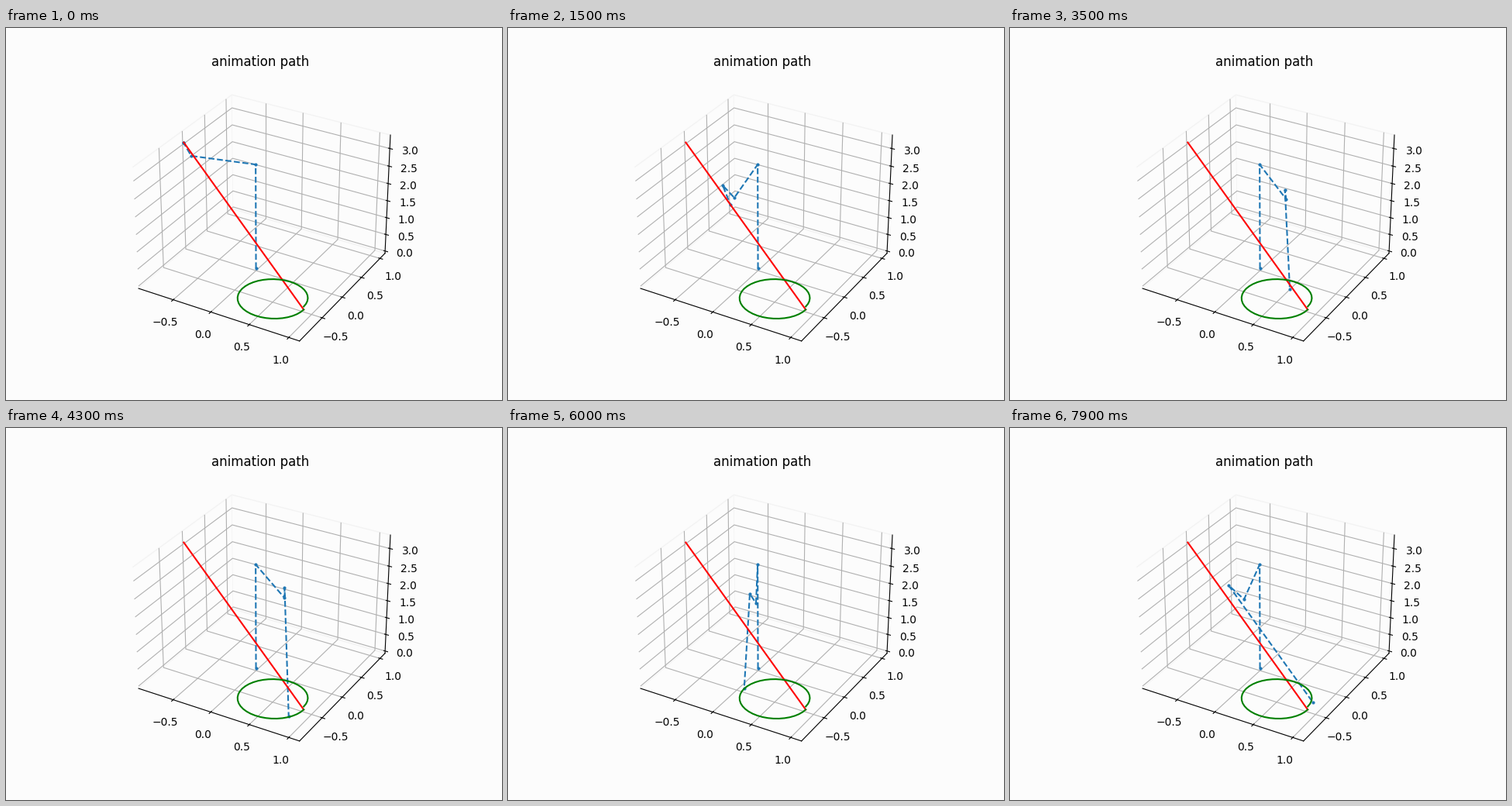
Write a matplotlib script that moves like this. It is 640 px wide and 480 px high and loops after 8000 ms.

```python
import numpy as np
import matplotlib.pyplot as plt
from matplotlib.animation import FuncAnimation
from matplotlib.lines import Line2D
from matplotlib.transforms import Affine2D
from mpl_toolkits.mplot3d import proj3d

WIDTH, HEIGHT = 640, 480
STEPS = 40          # frames per path section
BACKGROUND = "#fcfcfc"
frames = np.arange(2 * STEPS)

# Path of the tool: a straight move, then one slightly rising turn.
start = np.array([-0.838, -0.185, 3.31])
turn = np.linspace(0, 1, STEPS + 1)
angle = -2 * np.pi * turn
circle = np.column_stack([0.5 + 0.4 * np.cos(angle),
                          -0.5 + 0.4 * np.sin(angle), 0.09 * turn])
straight = start + turn[:, None] * (circle[0] - start)
path = np.vstack([straight[:-1], circle[:-1]])

fig = plt.figure(figsize=(WIDTH / 100, HEIGHT / 100), dpi=100,
                 facecolor=BACKGROUND)
ax = fig.add_subplot(projection="3d", facecolor=BACKGROUND)
ax.set_title("animation path")


def padded(low, high, margin):
    """Widen a data range by a relative margin plus the 3D box border."""
    pad = (high - low) * (margin + (1 + 2 * margin) / 48)
    return low - pad, high + pad


ax.set_xlim(*padded(start[0], 1, 0.05))
ax.set_ylim(*padded(-0.9, 1, 0.05))
ax.set_zlim(*padded(0, start[2], 0))
ax.set_xticks(np.arange(-0.5, 1.1, 0.5))
ax.set_yticks(np.arange(-0.5, 1.1, 0.5))
ax.set_zticks(np.arange(0, 3.1, 0.5))
for axis in (ax.xaxis, ax.yaxis, ax.zaxis):
    axis.set_pane_color((0.988, 0.988, 0.988, 1))
    axis.pane.set_edgecolor("#f3f3f3")

ax.plot(*straight.T, color="red")
ax.plot(*circle.T, color="green")
ax.apply_aspect()


def to_stage(points):
    """Project 3D points to stage pixels, y pointing down."""
    x, y, _ = proj3d.proj_transform(*points.T, ax.get_proj())
    pixels = ax.transData.transform(np.column_stack([x, y]))
    return np.column_stack([pixels[:, 0], HEIGHT - pixels[:, 1]])


def yaw(points, turn_by):
    """Rotate points clockwise about the base axis."""
    x, y, z = points.T
    c, s = np.cos(turn_by), np.sin(turn_by)
    return np.column_stack([c * x + s * y, c * y - s * x, z])


def spline(t, p):
    """Smooth curve through the points p at times t, for every frame."""
    slope = np.gradient(p, t, axis=0, edge_order=2)
    i = np.clip(np.searchsorted(t, frames, side="right") - 1, 0, len(t) - 2)
    h = (t[i + 1] - t[i])[:, None]
    s = (frames - t[i])[:, None] / h
    return ((1 + 2 * s) * (1 - s) ** 2 * p[i] + s * (1 - s) ** 2 * h * slope[i]
            + s ** 2 * (3 - 2 * s) * p[i + 1] + s ** 2 * (s - 1) * h * slope[i + 1])


base, shoulder = to_stage(np.array([[0, 0, 0], [0, 0, 3]]))

# Key poses on the stage: frame, elbow x and y, wrist x and y.
poses = np.array([
    (0, 239, 165, 229, 148),
    (15, 292, 219, 277, 203),
    (24, 326, 226, 317, 216),
    (39, 361, 219, 361, 206),
    (60, 320, 226, 312, 214),
    (79, 302, 221, 282, 203)], dtype=float)
elbow, wrist = np.split(spline(poses[:, 0], poses[:, 1:]), 2, axis=1)

# Halfway down the line the tool begins to sway off its path.
sway = 0.045 * np.sin(np.pi * np.maximum(frames / STEPS - 0.5, 0))
tip = to_stage(yaw(path, sway))

stage = Affine2D().scale(1 / WIDTH, -1 / HEIGHT).translate(0, 1) + fig.transFigure
arm = Line2D([], [], color="C0", linestyle="--", marker=".", markersize=4,
             zorder=1.9, transform=stage)
ax.add_artist(arm)


def update(frame):
    joints = [base, shoulder, elbow[frame], wrist[frame], tip[frame]]
    arm.set_data(*np.transpose(joints))
    return [arm]


animation = FuncAnimation(fig, update, frames=2 * STEPS, interval=100,
                          repeat=True, repeat_delay=0)
plt.show()
```
